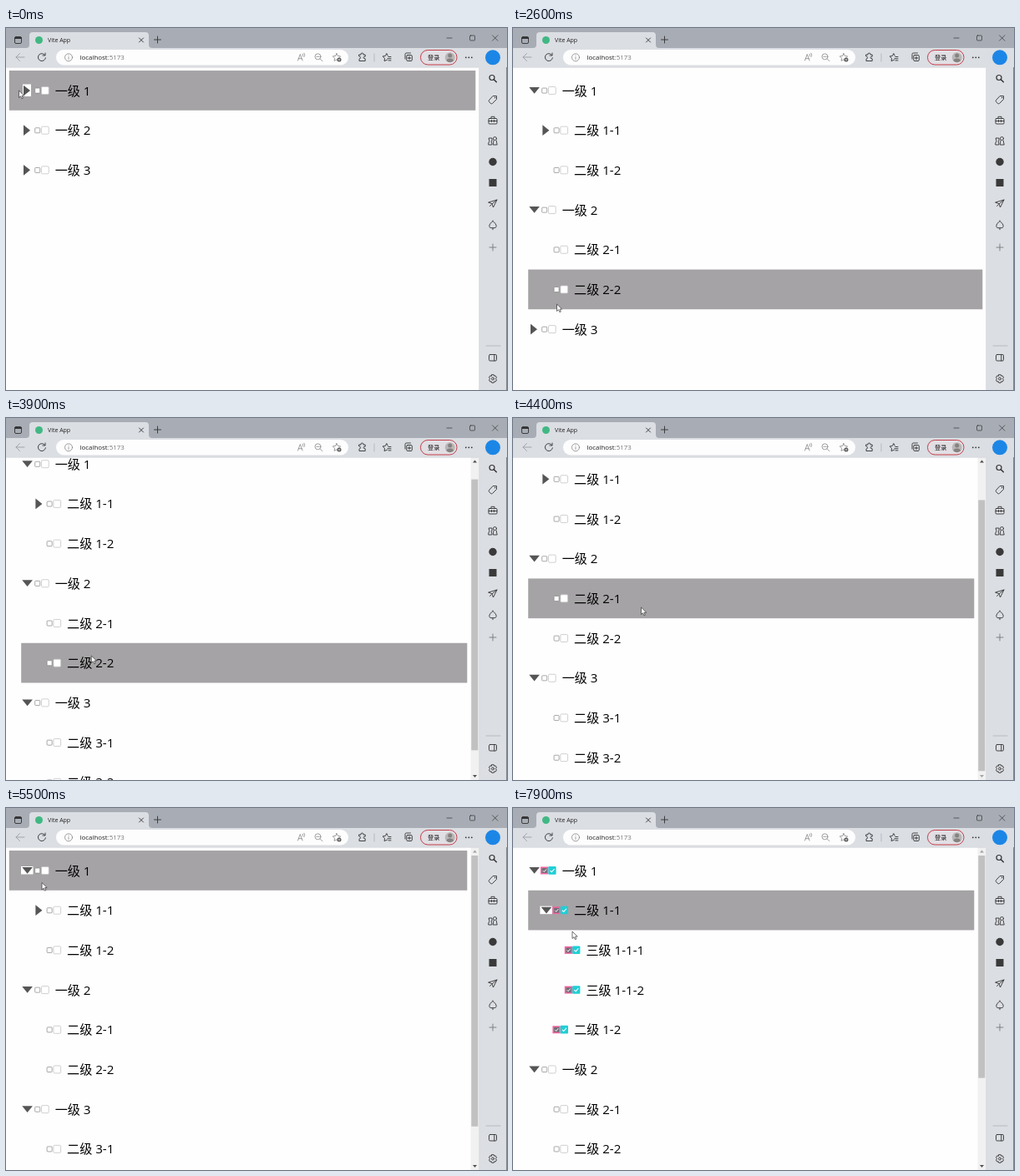
Recreate the animation shown at these times as an HTML page. Size 600 by 434 pixels, loop 8 s.

```html
<!DOCTYPE html>
<html lang="zh-CN">
<head>
<meta charset="utf-8">
<title>Vite App</title>
<style>
  html, body { margin: 0; width: 100%; height: 100%; overflow: hidden; background: #fefefe; }
  svg { display: block; width: 600px; height: 434px; }
  text { font-family: "Open Sans", "Noto Sans CJK SC", "Noto Sans CJK", sans-serif; }
  .label { font-size: 15.1px; fill: #000; }
  .line { fill: none; stroke: #333; stroke-width: .9; stroke-linecap: round; stroke-linejoin: round; }
  .thin { stroke-width: .7; }
  .dim { stroke: #9b9ea3; }
  .soft { stroke: #777; }
</style>
</head>
<body>
<svg viewBox="0 0 600 434">
  <defs><clipPath id="page"><rect y="47" width="566.5" height="387"/></clipPath></defs>
  <rect width="600" height="434" fill="#fefefe"/>

  <g clip-path="url(#page)">
    <g id="tree"></g>
    <g id="bar">
      <rect x="556.5" y="47" width="10" height="387" fill="#f1f1f1"/>
      <rect id="thumb" x="557.3" y="57" width="8" fill="#c1c1c1"/>
      <path id="up" d="M559 53.5h5l-2.5-3z"/>
      <path id="down" d="M559 428h5l-2.5 3z"/>
    </g>
  </g>

  <!-- window frame -->
  <rect width="600" height="24" fill="#a8adb5"/>
  <path d="M0 24H600V434H567V47H0z" fill="#dbdee3"/>
  <path d="M599.5 47V434" stroke="#85888d"/>
  <path d="M0 47.3H566.6V434" fill="none" stroke="#c9ccd1" stroke-width=".6"/>
  <path d="M24 24q4 0 4-4V9q0-4 4-4H167q4 0 4 4v11q0 4 4 4z" fill="#dbdee3"/>
  <g class="line">
    <rect x="10.5" y="10.5" width="8" height="8" rx="1.5"/>
    <path d="M11 12h7" stroke-width="2"/>
    <path d="M159.5 12l5 5m0-5l-5 5M181.5 10v8m-4-4h8"/>
    <path class="thin" d="M528 12h6M582.5 8.800l6.400 6.400m0-6.400l-6.400 6.400"/>
    <rect class="thin" x="555.5" y="9" width="6" height="6" rx="1"/>
  </g>
  <circle cx="39.5" cy="14.5" r="4.5" fill="#41b883"/>
  <text x="50" y="17.2" font-size="7" fill="#222">Vite App</text>

  <!-- toolbar -->
  <rect x="60" y="26" width="350" height="18.5" rx="9.2" fill="#fdfdfe"/>
  <path class="line dim" d="M22 35H12m4.500-4.500L12 35l4.500 4.500"/>
  <path class="line" d="M46.700 32.600A4.500 4.500 0 1 0 47.400 35.800M47 30v3h-3"/>
  <g class="line thin soft">
    <circle cx="75" cy="35.3" r="4.5"/>
    <path d="M75 34.800v2.700m0-4.600v.1"/>
    <path d="M349.500 39l2.800-7.500 2.800 7.500m-4.700-2.300h3.700M355.300 31.200q1 1.200 0 2.400M357 30.200q1.800 2.200 0 4.400"/>
    <circle cx="373.5" cy="34.3" r="3.5"/>
    <path d="M376.200 37l2.800 2.800M371.800 34.300h3.400"/>
    <path d="M396 30.500l1.400 2.900 3.300.5-2.300 2.300.4 3.200-2.800-1.500-2.900 1.500.5-3.200-2.300-2.300 3.300-.5z"/>
  </g>
  <circle cx="399" cy="38" r="2.5" fill="#555"/>
  <path d="M399 36.700v2.600m-1.300-1.300h2.600" stroke="#fff" stroke-width=".6"/>
  <text x="88.5" y="38.1" font-size="7.9" fill="#222">localhost<tspan fill="#777">:5173</tspan></text>
  <g class="line">
    <path d="M423 32h2q-.3-2 1.500-2t1.500 2h2.200v2.200q-2 0-2 1.300t2 1.300V39.500H423v-2.300q1.500-.3 1.500-1.700T423 33.800z"/>
    <path d="M441 31v9" stroke="#b4b7bc"/>
    <path d="M456.500 38.200l-3.400 1.400.4-3.300-2.400-2.300 3.200-.5 1.500-3 1.400 2.700M458 34.500h3m-4 2.200h4m-3 2.200h3"/>
    <rect x="479.8" y="32.5" width="6.5" height="7" rx="1.3"/>
    <path d="M478 37v-5.500q0-1.500 1.500-1.500h5M483 34.200v3.600m-1.800-1.800h3.600"/>
  </g>
  <rect x="496.5" y="26.5" width="43.5" height="17.5" rx="8.7" fill="#e2dfe4" stroke="#c43d47"/>
  <text x="505" y="38" font-size="7.2" font-weight="500" fill="#111">登录</text>
  <circle cx="531.7" cy="35.3" r="6" fill="#b9b7b6"/>
  <circle cx="531.7" cy="33" r="2.5" fill="#858281"/>
  <path d="M527.500 39.600q0-3 4.200-3t4.200 3q-4.200 3.200-8.400 0z" fill="#858281"/>
  <g fill="#333">
    <circle cx="550.8" cy="35.3" r=".9"/><circle cx="554.3" cy="35.3" r=".9"/><circle cx="557.8" cy="35.3" r=".9"/>
  </g>
  <circle cx="583" cy="35.3" r="9" fill="#1c86e6"/>

  <!-- side strip -->
  <g class="line">
    <circle cx="582" cy="59.5" r="3" stroke-width="1.2"/><path d="M584.300 61.800l3 3" stroke-width="1.5"/>
    <path d="M583.500 81.500h4v4l-5 5q-1 .7-2 0l-2-2.200q-.8-1 0-1.800z"/><circle cx="585.5" cy="83.5" r=".3"/>
    <rect x="578" y="108.5" width="10" height="6.5" rx="1"/><path d="M581 108.300v-2h4v2M578 111.500h10m-6.500-1v2m3-2v2"/>
    <circle cx="585.5" cy="132.5" r="2"/><path d="M584 135l-.8 5h5l-1-5M578.500 132h3.500v3l-1 1 .8 2.500v1.500h-4V138l1-2z"/>
    <path d="M578 209l10-3-4.500 9-1.500-4zm4 2l6-5m-8.500 7.500l1.500-1.500"/>
    <path d="M583 231.500c2.500 2 4.200 4 4.200 6 0 1.800-1.500 2.300-3.400 2.200h-1.600c-1.900.1-3.400-.4-3.400-2.200 0-2 1.700-4 4.200-6zm0 8.200v2"/>
    <path class="soft" d="M583 259v8m-4-4h8"/>
    <path d="M575 381h17" stroke="#b4b7bc"/>
    <rect x="578.5" y="391.5" width="9" height="7.5" rx="1.3"/><path d="M584.800 391.500v7.500"/>
    <circle cx="583" cy="420.5" r="1.5"/>
    <path d="M581.800 415.700h2.400l.5 1.500 1.500-.3 1.300 2-1 1.600 1 1.600-1.300 2-1.500-.3-.5 1.500h-2.400l-.5-1.500-1.500.3-1.300-2 1-1.600-1-1.600 1.300-2 1.500.3z"/>
  </g>
  <circle cx="583" cy="160.5" r="4.7" fill="#3a3a3a"/>
  <rect x="578.5" y="181" width="9" height="9" fill="#3a3a3a"/>

  <path id="cursor" d="M0 0v8.500l2-1.800 1.400 3 1.400-.6-1.300-3h2.700z" fill="#fff" stroke="#333" stroke-width=".7"/>
</svg>
<script>
const LOOP = 8000, STEP = 100, NEVER = 1e9;
const TOP = 51.1, PITCH = 47.7, INDENT = 14.4, VIEW = 387, TRACK = 367;
const $ = id => document.getElementById(id);

// kids: time at which the node opens; tick: time at which it is checked
const nodes = [
  { name: '一级 1', depth: 0, kids: 600, tick: 6500 },
  { name: '二级 1-1', depth: 1, up: 0, kids: 7600, tick: 6500 },
  { name: '三级 1-1-1', depth: 2, up: 1, tick: 6500 },
  { name: '三级 1-1-2', depth: 2, up: 1, tick: 6500 },
  { name: '二级 1-2', depth: 1, up: 0, tick: 6500 },
  { name: '一级 2', depth: 0, kids: 1800 },
  { name: '二级 2-1', depth: 1, up: 5 },
  { name: '二级 2-2', depth: 1, up: 5 },
  { name: '一级 3', depth: 0, kids: 3400 },
  { name: '二级 3-1', depth: 1, up: 8 },
  { name: '二级 3-2', depth: 1, up: 8 }
];

// time, x, y
const path = [
  [0, 15.5, 75], [200, 19, 75], [850, 19, 75], [1600, 28, 220], [1700, 26, 218],
  [1900, 26, 218], [2300, 42, 268], [2400, 42, 268], [2600, 52.500, 331], [3300, 25, 361],
  [3400, 25, 361], [3600, 49.500, 344], [4200, 155, 226], [4400, 153.500, 227], [5300, 50, 92],
  [5500, 43, 89.500], [6000, 36, 75], [6500, 36, 75], [7300, 57, 122], [7400, 34, 122],
  [7600, 34, 122], [7900, 71, 148]
];
const wheel = [[0, 0], [3700, 0], [4200, 49.4], [4500, 49.4], [5100, 0]];

function sample(keys, t) {
  const i = keys.findIndex(k => k[0] > t);
  if (i < 0) return keys[keys.length - 1].slice(1);
  const a = keys[i - 1], b = keys[i], f = (t - a[0]) / (b[0] - a[0]);
  return a.slice(1).map((v, n) => v + (b[n + 1] - v) * f);
}

const show = (el, on) => el.setAttribute('display', on ? 'inline' : 'none');

// Row coordinates are relative to the row's indent and middle line.
for (const n of nodes) {
  const g = document.createElementNS('http://www.w3.org/2000/svg', 'g');
  g.innerHTML = `
    <rect class="hover" x="3.8" y="-23.9" height="${PITCH}" fill="#a5a3a5"/>
    <g class="shut"><rect x="20" y="-7.5" width="10" height="14.5" fill="#fefefe"/>
      <path d="M21-6.300l8 6.300-8 6.300z" fill="#555"/></g>
    <g class="open"><rect x="18" y="-5" width="14.5" height="9.5" fill="#fefefe"/>
      <path d="M19.300-4h12.600l-6.300 7.800z" fill="#555"/></g>
    <g class="off" fill="#fff">
      <rect x="34.7" y="-2.9" width="6" height="6" rx=".8" stroke="#858585" stroke-width=".7"/>
      <rect x="42.5" y="-4.5" width="8.7" height="9" rx="1.3" stroke="#c4c4c4" stroke-width=".8"/></g>
    <g class="on" fill="none" stroke="#fff">
      <rect x="33" y="-4.5" width="9.3" height="9" fill="#f4649f" stroke="none"/>
      <rect x="34.7" y="-2.9" width="6" height="6" rx=".8" fill="#6f6f78" stroke="none"/>
      <path d="M35.800.2l1.500 1.500 2.500-3.200"/>
      <rect x="42.3" y="-4.9" width="9.3" height="9.6" rx="1" fill="#1fcfd6" stroke="none"/>
      <path d="M44.600.1l1.700 1.700 3.200-3.700" stroke-width="1.1"/></g>
    <text class="label" x="58.7" y="5.6">${n.name}</text>`;
  $('tree').append(g);
  n.g = g;
  n.part = k => g.querySelector('.' + k);
}

const isOpen = (n, t) => t >= (n.kids ?? NEVER);
const isShown = (n, t) => n.up === undefined || (isOpen(nodes[n.up], t) && isShown(nodes[n.up], t));

function render(t) {
  const [x, y] = sample(path, t);
  const [scroll] = sample(wheel, t);
  const hoverY = sample(path, Math.max(0, t - STEP))[1]; // hover trails the pointer
  const rows = nodes.filter(n => isShown(n, t));
  const total = rows.length * PITCH + 8;
  const long = total > VIEW;
  const hovered = rows[Math.floor((hoverY + scroll - TOP) / PITCH)];

  for (const n of nodes) {
    const i = rows.indexOf(n), dx = n.depth * INDENT;
    show(n.g, i >= 0);
    if (i < 0) continue;
    n.g.setAttribute('transform', `translate(${dx} ${TOP + (i + .5) * PITCH - scroll})`);
    const ticked = t >= (n.tick ?? NEVER);
    show(n.part('hover'), n === hovered);
    n.part('hover').setAttribute('width', (long ? 548.5 : 558.5) - dx);
    show(n.part('shut'), n.kids && !isOpen(n, t));
    show(n.part('open'), isOpen(n, t));
    show(n.part('off'), !ticked);
    show(n.part('on'), ticked);
  }

  show($('bar'), long);
  $('thumb').setAttribute('height', TRACK * Math.min(1, VIEW / total));
  $('thumb').setAttribute('y', 57 + TRACK * scroll / total);
  $('up').setAttribute('fill', scroll > 0 ? '#505050' : '#a3a3a3');
  $('down').setAttribute('fill', scroll < total - VIEW - 1 ? '#505050' : '#a3a3a3');
  $('cursor').setAttribute('transform', `translate(${x} ${y})`);
}

const start = performance.now();
function tick() {
  const t = (performance.now() - start) % LOOP;
  render(Math.floor(t / STEP) * STEP);
  requestAnimationFrame(tick);
}
tick();
</script>
</body>
</html>
```
